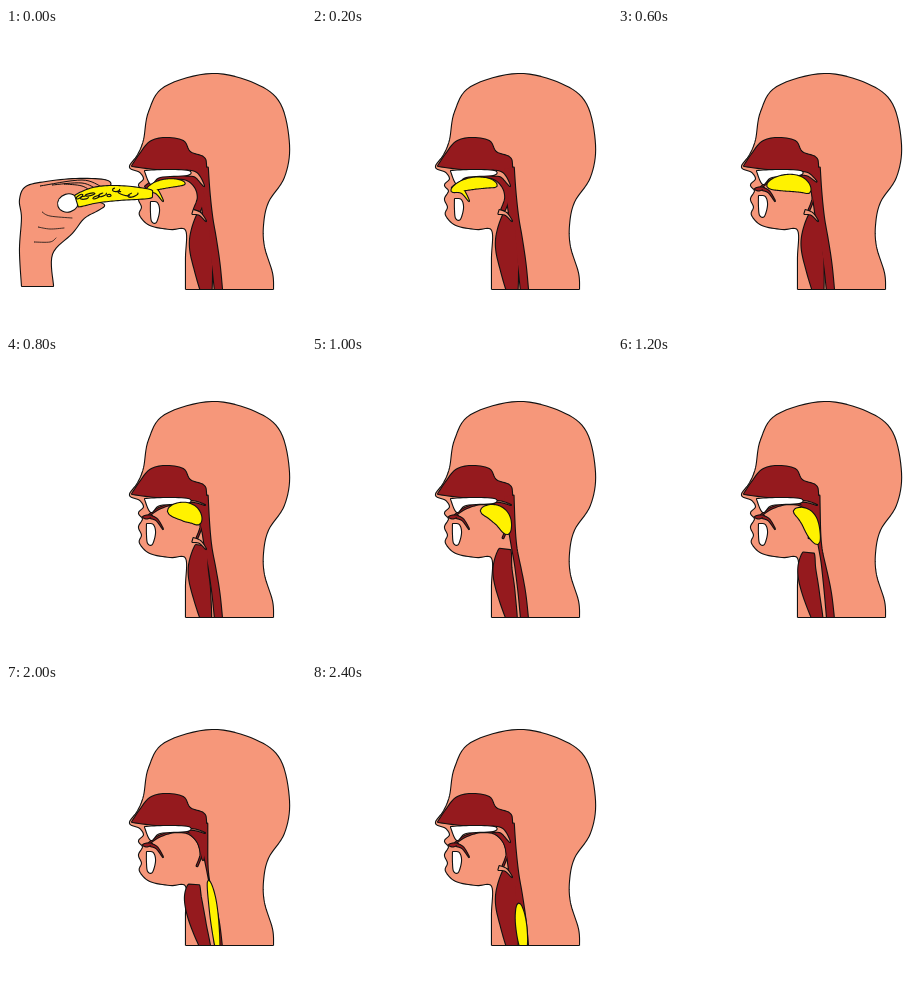
Recreate the animation shown at these times as an HTML page with a canvas. Size 300x300 px, loop 2.5 s.

```html
<!DOCTYPE html>
<html lang="en">
<head>
<meta charset="utf-8">
<title>Swallowing</title>
<style>
html, body { margin: 0; width: 100%; height: 100%; overflow: hidden; background: #fff; }
canvas { display: block; width: 300px; height: 300px; }
</style>
</head>
<body>
<canvas id="stage" width="300" height="300"></canvas>
<script>
const ctx = document.getElementById('stage').getContext('2d');
const SKIN = '#f6977a', RED = '#951a1e', YELLOW = '#fff200', WHITE = '#fff', INK = '#111';
const LOOP = 2500, STEP = 100, STEPS_PER_STAGE = 4, HAND_OUT = 200, FLOOR = 261.5;

const pts = s => s.trim().split(/\s+/).map(p => p.split(',').map(Number));
const lerp = (a, b, f) => a + (b - a) * f;
const blend = (a, b, f) => a.map(([x, y], i) => [lerp(x, b[i][0], f), lerp(y, b[i][1], f)]);
const smooth = (a, b, x) => {
  const f = Math.max(0, Math.min(1, (x - a) / (b - a)));
  return f * f * (3 - 2 * f);
};
const bell = (x, mid, width) => Math.exp(-(((x - mid) / width) ** 2));
const arch = (u, power) => Math.max(0, Math.sin(Math.PI * u)) ** power;

// Value of a list at a fractional index
const at = (list, p) => {
  const i = Math.min(Math.floor(p), list.length - 2);
  return lerp(list[i], list[i + 1], p - i);
};

// Point on a Catmull-Rom curve, u counted in control points
function spot(p, u) {
  const i = Math.max(0, Math.min(p.length - 2, Math.floor(u))), f = u - i;
  const q = k => p[Math.max(0, Math.min(p.length - 1, i + k))];
  const [a, b, c, d] = [q(-1), q(0), q(1), q(2)];
  return [0, 1].map(k => b[k] + f / 2 * (c[k] - a[k] +
    f * (2 * a[k] - 5 * b[k] + 4 * c[k] - d[k] + f * (3 * (b[k] - c[k]) + d[k] - a[k]))));
}

function polygon(p, closed = true) {
  const path = new Path2D();
  p.forEach(([x, y]) => path.lineTo(x, y));
  if (closed) path.closePath();
  return path;
}

function curve(p, closed = true) {
  const n = (p.length - 1) * 8;
  return polygon(Array.from({ length: n + 1 }, (_, i) => spot(p, i / 8)), closed);
}

// Band along a curve; half(u) is its half width for u from 0 to 1
function ribbon(p, half, from = 0, to = p.length - 1) {
  const left = [], right = [], n = 40;
  for (let i = 0; i <= n; i++) {
    const s = lerp(from, to, i / n), h = half(i / n);
    const [x, y] = spot(p, s), a = spot(p, s - 0.01), b = spot(p, s + 0.01);
    const angle = Math.atan2(b[1] - a[1], b[0] - a[0]);
    const dx = -Math.sin(angle) * h, dy = Math.cos(angle) * h;
    left.push([x + dx, y + dy]);
    right.unshift([x - dx, y - dy]);
  }
  return polygon([...left, ...right]);
}

function stroke(path, width = 1.2) {
  ctx.lineWidth = width;
  ctx.strokeStyle = INK;
  ctx.stroke(path);
}

// Paints paths so that they share one outer outline
function paint(color, ...paths) {
  paths.forEach(path => stroke(path, 2.2));
  ctx.fillStyle = color;
  paths.forEach(path => ctx.fill(path));
}

function randomizer(seed) {
  return () => (seed = seed * 16807 % 2147483647) / 2147483647;
}

const head = curve(pts(`180,261.5 180,230 180,202 164,201 144,197 134,187 136,179 133,171
  137,163 133,157 138,151 134,144 124,139 132,127 138,112 143,84 159,59 206,46 249,56
  274,76 283,117 278,149 262,174 257,197 258,219 266,245 267,261.5`));
const nose = curve(pts(`126,138 134,126 144,114 159,110 177,113 184,124 197,129 200,137
  199,160 197,176 192,159 183,148 180,143 150,141 126,138`));
const upperTeeth = curve(pts('139,143 160,142 182,143 181,147 154,149 145,156 139,143'));
const lowerTooth = pts('141,168 147,169 149,177 146,188 142,187 141,178 141,168');
const tongueTop = pts('141,161 152,153 167,148 182,149 192,158 195,170 191,182');
const tongueFloor = pts('145,161 151,164 157,173');
const lips = pts('137,161 141,161 146,160');

const foodRoute = pts(`138,164 150,158 165,155 180,156 190,163 196,178 202,195
  206,215 209,240 212,268`);
const gullet = pts('197,140 199,165 202,190 206,212 210,238 213,268');
const windpipeOpen = pts('198,186 194,212 197,238 201,268');
const windpipeShut = pts('188,201 187,215 192,239 201,268');
const palateLow = pts('180,145 190,147 198,158'), palateHigh = pts('180,145 190,146 199,149');
const epiglottis = pts('187,184 194,186 200,193');

// Food position and thickness at each stage of the swallow
const tail = [0.3, 0.1, 1.8, 2.7, 5, 6.1, 7.2];
const tip = [2.9, 3.9, 4.4, 5.6, 7.7, 9, 9];
const girth = [4, 7, 9, 7.5, 6.5, 3.6, 5];

const hand = curve(pts(`16,258 14,222 16,190 14,172 20,159 40,154 70,151 98,152 104,157
  90,162 88,172 98,177 92,182 78,190 66,205 46,226 47,258`));
const tube = pts('71,173 90,167 115,165 146,166');

function drawHand() {
  paint(SKIN, hand);
  for (let i = 0; i < 3; i++) {
    stroke(curve([[34 + 12 * i, 158 - i], [76, 152 + 3 * i], [96 - 4 * i, 159 + 3 * i]], false), 1);
    stroke(curve([[36 - 4 * i, 184 + 15 * i], [44, 188 + 13 * i], [66 - 8 * i, 190 + 10 * i]], false), 0.8);
  }
  const end = new Path2D();
  end.ellipse(62, 175, 10, 8.5, -0.3, 0, 7);
  paint(WHITE, end);
  paint(YELLOW, ribbon(tube, u => 3 + 4.5 * arch(0.15 + 0.85 * u, 0.7)));
  const random = randomizer(11);
  for (let i = 0; i < 9; i++) {
    const [x, y] = spot(tube, 0.2 + i * 0.27), mark = new Path2D();
    mark.ellipse(x, y + 7 * (random() - 0.5), 2 + 4 * random(), 1 + random(), random() - 0.6, 0, 4 + 3 * random());
    stroke(mark, 1.2);
  }
}

function draw(t) {
  const p = Math.floor(t / STEP) / STEPS_PER_STAGE;
  const jaw = 1 - smooth(0, 1, p);
  const raised = smooth(1, 2, p) - smooth(5, 6, p);
  const shut = smooth(1, 4, p) - smooth(5, 6, p);
  const eating = p < 1.5;

  ctx.fillStyle = WHITE;
  ctx.fillRect(0, 0, 300, 300);
  ctx.lineJoin = ctx.lineCap = 'round';
  ctx.save();
  ctx.beginPath();
  ctx.rect(0, 0, 300, FLOOR);
  ctx.clip();

  paint(SKIN, head);
  paint(RED, nose,
    ribbon(gullet, u => lerp(4.8, 3.5, u) * (1 - shut * bell(u, 0.45, 0.3))),
    ribbon(blend(windpipeOpen, windpipeShut, shut),
      u => 3.8 + lerp(6.5, 4.5, shut) * arch(0.1 + 0.9 * u, 1)),
    ribbon(tongueTop, () => 0.4 + 2.8 * jaw));
  paint(SKIN, ribbon(blend(palateLow, palateHigh, raised), u => (2.5 - 2.2 * raised) * (1 - u * u)));
  if (shut < 0.5) paint(SKIN, ribbon(epiglottis, u => 2 * (1 - u)));
  paint(WHITE, upperTeeth);
  paint(WHITE, curve(lowerTooth.map(([x, y]) => [x + 4 * jaw, y + 6 * jaw])));

  const floor = ribbon(tongueFloor, u => (eating ? 3 : 1.2) * (1 - u));
  const food = ribbon(foodRoute, u => at(girth, p) * arch(u, 0.5), at(tail, p), at(tip, p));
  if (eating) {
    paint(YELLOW, food, floor);
  } else {
    paint(RED, floor, ribbon(lips, u => 1.4 * arch(u, 1)));
    paint(YELLOW, food);
  }
  if (t < HAND_OUT) drawHand();
  ctx.restore();
  stroke(polygon([[180, FLOOR], [267, FLOOR]], false));
}

function tick() {
  draw(performance.now() % LOOP);
  requestAnimationFrame(tick);
}
tick();
</script>
</body>
</html>
```
